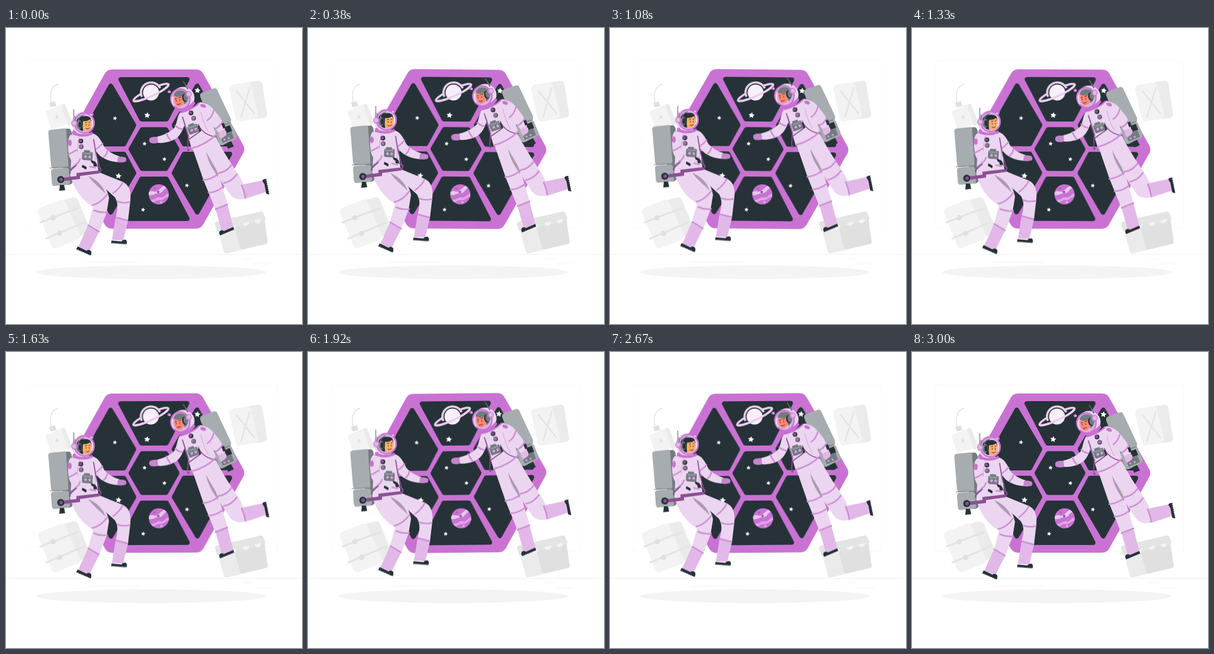
Animation of 500x500 px, one loop 3040 ms. Source, as an HTML page:

```html
<!DOCTYPE html>
<html lang="en">
<head>
<meta charset="utf-8">
<title>Astronauts by a space window</title>
<style>
html, body { margin: 0; width: 100%; height: 100%; overflow: hidden; background: #fff; }
svg { display: block; width: 100%; height: 100%; }

.sway { transform-origin: 250px 204.5px; animation: sway 3040ms linear infinite; }
.float { animation: float 3040ms linear infinite; }
/* a 3 s cycle followed by a 40 ms rest */
@keyframes sway {
  0%, 98.684%, 100% { transform: rotate(0deg); }
  24.671% { transform: rotate(1deg); }
  74.013% { transform: rotate(-1deg); }
}
@keyframes float {
  0%, 49.342%, 98.684%, 100% { transform: translateY(0); }
  24.671%, 74.013% { transform: translateY(-10px); }
}

.suit { fill: #ecd5f0; }
.shin { fill: #e2b8e8; }
.purple { fill: #c972d3; }
.plum { fill: #8a4f93; }
.glove { fill: #c486cd; }
.dark { fill: #263238; }
.gray { fill: #a6acaf; }
.slate { fill: #737b80; }
.shade { fill: #ad9ab1; }
.line { fill: none; stroke: #cd8fd6; stroke-width: 2.6; stroke-linecap: round; }
.strap { fill: none; stroke: #8a4f93; stroke-width: 1.7; stroke-linecap: round; stroke-linejoin: round; }
.fold { fill: none; stroke: #cfa6d6; stroke-width: 1; }
.ring { fill: none; stroke: #c972d3; stroke-width: 2.4; }
.tread { fill: none; stroke: #263238; stroke-width: 2.6; stroke-dasharray: 2.2 1.2; }
.round { stroke-linejoin: round; }
.a { fill: #f3f3f3; stroke: #f3f3f3; }
.b { fill: #ebebeb; stroke: #ebebeb; }
.c { fill: #e0e0e0; stroke: #e0e0e0; }
</style>
</head>
<body>
<svg viewBox="0 0 500 500">
<defs>
  <path id="star" fill="#fff" d="M0-5.300 1.600-2 5.100-1.600 2.500.8 3.200 4.300 0 2.600-3.200 4.300-2.500.8-5.100-1.600-1.600-2Z"/>
  <path id="endCell" d="M-56-117.500H56L21-50.500H-21Z"/>
  <path id="sideCell" d="M-73-106.500-34-40.500-51-8.500H-128Z"/>
  <g id="camera">
    <path class="slate" d="M-6-9H4V-5H-6Z"/>
    <rect class="slate" x="-9" y="-6" width="18" height="14" rx="2"/>
    <path fill="#8f979b" d="M-7-5H7V-2H-7Z"/>
    <circle cx="-3" cy="2" r="2.300" fill="#d9a3e0"/>
    <circle cx="4" cy="2" r="2.300" fill="#d9a3e0"/>
  </g>
  <g id="button">
    <circle class="dark" r="4"/>
    <circle class="plum" cx="-.7" cy="-.4" r="2.600"/>
  </g>
</defs>

<!-- backdrop -->
<g fill="none" stroke="#f5f5f5">
  <rect x="39.500" y="55.500" width="203" height="282" rx="2" stroke="#f9f9f9"/>
  <rect x="255.500" y="55.500" width="203" height="282" rx="2" stroke="#f9f9f9"/>
  <path stroke="#ededed" stroke-width=".7" d="M0 382.500H500"/>
  <path d="M135 395.500H224M400 390H416M417 398.500H448"/>
</g>
<ellipse cx="245" cy="412.500" rx="194" ry="11.500" fill="#f4f4f4"/>

<!-- fuse canister -->
<path d="M88 95C77 98 73 109 76 125" fill="none" stroke="#e0e0e0" stroke-width="1.500"/>
<g class="round" stroke-width="4">
  <path class="c" stroke-width="2" d="M74 127 82 125 84 131 76 133Z"/>
  <path class="a" d="M69 142 96 130 106 160 78 168Z"/>
  <path class="b" d="M96 132 98 130 110 160 106 163Z"/>
  <path class="c" stroke-width=".5" d="M85.500 146 89 151 83.500 153Z"/>
</g>

<!-- crossed crate -->
<g class="round" stroke-width="12">
  <path class="b" d="M384 102 427 95 435 146 394 151Z"/>
  <path class="a" d="M383 103 408 98 420 147 394 152Z"/>
</g>
<path d="M389 106 420 145M412 100 397 151" fill="none" stroke="#e4e4e4" stroke-width="2.600"/>

<!-- chest -->
<g class="round" stroke-width="14">
  <path class="b" d="M85 301 115 293 134 339 115 350Z"/>
  <path class="a" d="M61 310 94 297 118 351 83 365Z"/>
</g>
<path d="M57 329 103 311 123 304M67 356 114 336 133 328" fill="none" stroke="#e4e4e4" stroke-width="3"/>
<circle class="c" cx="79.500" cy="320.500" r="4"/>
<circle class="c" cx="90.500" cy="347" r="4"/>

<!-- lidded box -->
<g class="round" stroke-width="8">
  <path class="b" d="M363 345 400 336 408 368 372 377Z"/>
  <path class="c" d="M391 339 433 326 438 361 399 370Z"/>
  <path fill="#e4e4e4" stroke="#e4e4e4" d="M357 331 431 314 434 321 360 340Z"/>
</g>
<path class="a" d="M400 330 410 327.500A5 5 0 0 1 400 330ZM420 325.500 430 323A5 5 0 0 1 420 325.500ZM378 335.500 388 333A5 5 0 0 1 378 335.500Z"/>

<!-- window -->
<g class="sway">
  <path class="round purple" stroke="#c972d3" stroke-width="28" d="M179 84H321L388.500 204.500 321 325H179L111.500 204.500Z"/>
  <g class="round dark" stroke="#263238" stroke-width="8" transform="translate(250 204.500)">
    <path d="M-39 0-20-33H20L39 0 20 33H-20Z"/>
    <use href="#endCell"/>
    <use href="#endCell" transform="scale(1 -1)"/>
    <use href="#sideCell"/>
    <use href="#sideCell" transform="scale(-1 1)"/>
    <use href="#sideCell" transform="scale(1 -1)"/>
    <use href="#sideCell" transform="scale(-1 -1)"/>
  </g>
  <use href="#star" transform="translate(238.500 147.500) rotate(8)"/>
  <use href="#star" transform="translate(190 250) rotate(8)"/>
  <use href="#star" transform="translate(323.500 105.500) rotate(8)"/>
  <use href="#star" transform="translate(184 152.500) rotate(12) scale(.7)"/>
  <use href="#star" transform="translate(234 195.500) rotate(12) scale(.7)"/>
  <use href="#star" transform="translate(267.500 221.500) rotate(12) scale(.7)"/>
  <use href="#star" transform="translate(305.500 266) rotate(12) scale(.7)"/>
  <use href="#star" transform="translate(231.500 307) rotate(12) scale(.7)"/>

  <!-- ringed planet -->
  <g transform="translate(245 109) rotate(-25)" fill="none" stroke="#ebcdf0" stroke-width="3.600">
    <ellipse rx="32.500" ry="6"/>
    <circle r="16" fill="#263238" stroke="none"/>
    <path d="M-17 0A17 17 0 0 1 17 0"/>
    <circle r="13.500" fill="#f8effa" stroke="none"/>
    <path d="M-32.500 0A32.500 6 0 0 0 32.500 0"/>
  </g>

  <!-- banded planet -->
  <g transform="translate(258 281)">
    <circle class="purple" r="17"/>
    <path fill="#e9c6ee" d="M-16.500-4C-10-8-7-2-2-6 3-9 5-13 9-14.400L13-11C7-8 6-1 0-2-6-2-10 3-17 1Z"/>
    <path fill="#dda6e4" d="M-14 9C-6 10-3 3 3 5 9 7 11-2 17-1L16.500 4C11 4 9 10 2 10-5 9-6 14-11 13Z"/>
    <circle class="plum" cx="-1" cy="-4" r="2"/>
    <circle fill="#e9c6ee" cx="4" cy="13" r="1.600"/>
    <circle fill="#b45fbe" cx="-7" cy="-10" r="2"/>
  </g>
</g>

<!-- left astronaut -->
<g class="float">
  <path class="slate" d="M96 170 107 170Q111 172 111 180L113 260Q111 265 104 265H97Z"/>
  <path class="gray" d="M75 172 99 169.500Q102 170 102.500 174L106 231Q106 235 102 235.500L80 237Q77 237 76 232L71.500 177Q71 173 75 172Z"/>
  <path class="gray" d="M79 238 103 236Q106 237 106.500 240L108 261Q108 264 105 265L81 267Q78 266 77.500 263L76 242Q76 239 79 238Z"/>
  <path fill="none" stroke="#737b80" d="M74 236.500 104 235M102 172 106 233"/>
  <path class="dark" d="M91 265H98L100 274 90 275Z"/>

  <!-- far leg -->
  <path class="suit" d="M126 246 156 243C168 248 182 254 195 259 206 263 212 273 210 292L206 326 185 321C189 306 190 296 184 286L164 268Z"/>
  <path class="shin" d="M185 320 206 326 198 359 179 358Z"/>
  <path class="line" d="M197 261Q192 271 181 279M188 293Q198 297 209 294M186 320 205 325"/>
  <path class="dark" d="M178 359 195 360.500Q198 356 203 358 205 361 204 364.500L178 362.500Z"/>
  <path class="tread" d="M178 362.500 203 364.500"/>

  <!-- near leg -->
  <path class="suit" d="M108 247 142 245C160 256 171 270 174 287L170 312 158 343 139 332 147 302C129 291 115 274 108 247Z"/>
  <path class="shade" d="M139 250C153 256 165 267 168 280 160 271 148 263 139 250Z"/>
  <path class="shin" d="M139 332 158 343 141 377 122 370Z"/>
  <path class="line" d="M146 299Q160 296 171 281M149 308Q160 313 171 311M139 333 157 344"/>
  <path class="dark" d="M121 369 136 376Q140 373 144 377 145 381 143 384L119 373Z"/>
  <path class="tread" d="M119.500 373 143 383"/>

  <!-- far arm -->
  <path class="suit" d="M146 178C156 180 161 191 166 201 174 210 183 214 192 217L190 226.500C178 226 164 222 156 213 150 206 148 196 146 188Z"/>
  <path class="glove" d="M189 218Q197 216 202 219 205 222.500 202 226 196 228 188 226.500Z"/>
  <path class="line" d="M152 205Q158 201 163 195M165 218Q170 214 171 208"/>

  <!-- torso -->
  <path class="suit" d="M112 178Q128 173 148 179L151 194 156 241Q132 252 109 249L110 222Z"/>
  <path class="fold" d="M124 184Q119 200 121 226M149 196Q152 215 150 228"/>
  <path class="strap" d="M148 188 152 212 159 239M107 243 122 229"/>
  <path class="ring" d="M113 179Q130 185 147 178"/>
  <use href="#button" x="126.500" y="191"/>
  <use href="#button" x="127" y="200.500" opacity=".72"/>
  <path class="dark" d="M142 222 151 226 154 232 148 234Z"/>
  <use href="#camera" transform="translate(137.500 215.500) rotate(3)"/>

  <!-- near arm -->
  <path class="suit" d="M110 180C104 184 104 198 106 213 108 226 121 237 136 239L142 229C131 225 123 218 120 209 119 198 120 184 110 180Z"/>
  <ellipse class="purple" cx="107.800" cy="194" rx="3.200" ry="5.500"/>
  <path class="line" d="M106 213Q112 211 119 206M117 231Q123 228 125 221"/>
  <path class="dark" d="M129 231 135 234Q138 236 135 239L128 235Z"/>
  <path class="suit" d="M137 229Q146 226 152 232 154 238 146 240L136 239Z"/>
  <path class="line" stroke-width="1.500" d="M142 234 151 236"/>

  <!-- control arm -->
  <path class="strap" d="M107 245Q110 234 119 232M151 232 160 237Q162 242 157 243"/>
  <path class="plum" d="M92 253.500 119 250 119 245 158 240.500Q160 243 158 245.500L125 250 125 255 93 259Z"/>
  <circle class="dark" cx="92.500" cy="256" r="6"/>
  <circle class="plum" cx="93" cy="256" r="3"/>
  <circle class="dark" cx="150.500" cy="231" r="3"/>

  <!-- head -->
  <ellipse class="suit" cx="130" cy="160.500" rx="19.500" ry="18.500"/>
  <path class="purple" d="M113 174Q130 184 146 175L146 180Q130 187 114 180Z"/>
  <ellipse fill="#dfb0e6" cx="132.500" cy="160.500" rx="16" ry="16.500"/>
  <path class="dark" d="M121 166C116 154 123 148 132 149 140 148 145 152 144 158L132 163 130 174Q123 173 121 166Z"/>
  <path fill="#ffae67" d="M130 157.500Q138 157.500 142.500 154 145.500 162 143.500 168 141 175 135 175 130 174 129.500 168Z"/>
  <path fill="none" stroke="#263238" stroke-linecap="round" d="M134 160 136.500 159.500M140 159.500 142 159M135.500 163V164.500M140.500 163V164.500M135 170Q138 171.500 141 169"/>
  <ellipse class="slate" cx="123.500" cy="163" rx="4.500" ry="7.500"/>
  <ellipse class="dark" cx="125" cy="163" rx="2.500" ry="5"/>
  <path fill="none" stroke="#737b80" stroke-width="1.500" d="M122 156Q124 148 132 147"/>
  <ellipse class="ring" cx="132.500" cy="160.500" rx="16.500" ry="17"/>
  <path fill="none" stroke="#f7eaf9" stroke-width="1.500" d="M144 153Q148 160 145 168"/>
  <circle class="purple" cx="145" cy="146" r="3"/>
  <circle class="suit" cx="143.500" cy="146.500" r="1.500"/>
  <path fill="none" stroke="#737b80" stroke-width="1.300" d="M114.500 137V158M117 149V158"/>
  <circle class="glove" cx="115.500" cy="161" r="5.300"/>
  <circle cx="115" cy="161" r="3.400" fill="#e2b8e8"/>
</g>

<!-- right astronaut -->
<g class="float">
  <path class="slate" d="M328 112 347 104 389 186 354 200 338 150Z"/>
  <path class="gray" d="M331 109 351 102Q355 101 357 105L380 154Q381 158 378 160L353 168Q350 168 348 165L328 116Q327 111 331 109Z"/>
  <path class="gray" d="M354 169 378 161Q381 161 382 164L389.500 182Q390 186 387 188L366 198Q362 199 360 195L352 173Z"/>
  <path fill="none" stroke="#737b80" d="M352 169 380 159.500"/>
  <path class="dark" d="M372 195 380 191 385 200 375 204Z"/>
  <path class="dark" d="M368 168 378 164 382 174 371 178Z"/>

  <!-- back leg -->
  <path class="suit" d="M320 200 354 183C365 206 378 225 389 242 396 252 399 258 401 264L405 288Q387 292 379 282L344 230Z"/>
  <path class="shin" d="M397 265 435 257 439 277 404 288.500Z"/>
  <path class="line" d="M359 245Q373 243 381 231M368 262Q382 259 390 247M398 266Q403 276 404 287"/>
  <path class="dark" d="M433 258Q434 255 438.500 255L444.500 281 439.500 280 436.500 264Z"/>
  <path class="tread" d="M438.500 255 443.500 281"/>

  <!-- front leg -->
  <path class="suit" d="M315 203 334 196C342 217 352 236 361 253L375 300 354 307 334 258Z"/>
  <path class="shade" d="M338 209C341 227 350 239 358 252 360 243 349 230 338 209Z"/>
  <path class="shin" d="M354 306 374 298 384 336 365 345Z"/>
  <path class="line" d="M333 257Q346 256 358 247M342 278Q354 278 366 269M354 306 374 298"/>
  <path class="dark" d="M361 343Q365 340 368 343L384 336 385 340 362 350Q359 347 361 343Z"/>
  <path class="tread" d="M361.500 349 385 339.500"/>

  <!-- reaching arm -->
  <path class="suit" d="M296 141C289 147 290 157 285 168 276 177 266 181 254 184L256 194C270 195 285 191 293 181 299 173 302 163 304 155Z"/>
  <path class="glove" d="M256 184Q247 183 243 186 240 190 244 194 250 196 257 194Z"/>
  <path class="line" d="M286 165Q291 170 298 171M271 178Q273 184 278 190"/>

  <!-- torso -->
  <path class="suit" d="M293 143Q312 138 329 125L341 130 344 145 355 181Q338 198 314 205L304 172Z"/>
  <path class="fold" d="M329 141Q333 160 342 176M300 154Q306 170 310 185"/>
  <path class="strap" d="M298 150 308 182 307 203M325 163Q332 180 354 184M309 188 326 176"/>
  <path class="line" d="M314 203Q338 197 355 180"/>
  <path class="ring" d="M294 143Q313 139 327 126"/>
  <use href="#button" x="312.500" y="143.500"/>
  <use href="#button" x="317" y="152.500" opacity=".72"/>
  <path class="dark" d="M322 166 326 165 330 174 326 176Z"/>
  <use href="#camera" transform="translate(316 170) rotate(-20)"/>
  <circle class="plum" cx="308" cy="206" r="2"/>

  <!-- resting arm -->
  <path class="suit" d="M326 127C338 125 348 132 355 143 362 151 368 160 370 172L361 180C357 172 349 165 341 157 333 149 326 140 326 127Z"/>
  <ellipse class="purple" cx="333" cy="131.500" rx="5" ry="3" transform="rotate(20 333 131.500)"/>
  <path class="line" d="M340 156Q348 151 351 139M354 170Q361 167 366 158"/>
  <path class="dark" d="M364 162 368 160 371 168 367 170Z"/>
  <path class="slate" d="M362 182 381 175 385 186 366 194Z"/>
  <path class="shin" d="M359 176Q365 171 371 173 374 177 371 182L364 187Q359 184 359 176Z"/>
  <circle fill="#d9a3e0" cx="369" cy="188.500" r="1.800"/>
  <circle fill="#d9a3e0" cx="376" cy="186" r="1.800"/>

  <!-- head -->
  <ellipse class="suit" cx="299" cy="118" rx="19.500" ry="18.500"/>
  <path class="purple" d="M289 137Q306 137 317 123L320 127Q310 142 291 141Z"/>
  <ellipse fill="#dfb0e6" cx="294.500" cy="120" rx="15.500" ry="16.500" transform="rotate(-20 294.500 120)"/>
  <path class="slate" d="M283 114C285 105 295 103 303 108 311 114 308 124 302 129L295 120Z"/>
  <path fill="#ff8672" d="M284 115Q293 118 299 114L301 126Q297 134 290 133 283 128 284 115Z"/>
  <path fill="none" stroke="#263238" stroke-linecap="round" d="M285.500 120 288 119M292 118 295 117M287.500 122V123.500M293.500 121V122.500M289 129Q292 130 295 127.500"/>
  <ellipse class="dark" cx="302" cy="118" rx="4.500" ry="7" transform="rotate(-15 302 118)"/>
  <ellipse class="slate" cx="303.500" cy="117.500" rx="3.500" ry="6" transform="rotate(-15 303.500 117.500)"/>
  <ellipse class="ring" cx="294.500" cy="120" rx="16" ry="17" transform="rotate(-20 294.500 120)"/>
  <path fill="none" stroke="#f7eaf9" stroke-width="1.500" d="M281 116Q279 125 284 131"/>
  <circle class="purple" cx="275.500" cy="107.500" r="2.600"/>
  <circle class="suit" cx="277" cy="108" r="1.300"/>
  <path fill="none" stroke="#737b80" stroke-width="1.300" d="M299 90 308 103M303 97 307 104"/>
  <circle class="glove" cx="308.500" cy="111.500" r="5.300"/>
  <circle cx="309" cy="111.500" r="3.400" fill="#e2b8e8"/>
</g>
</svg>
</body>
</html>
```
